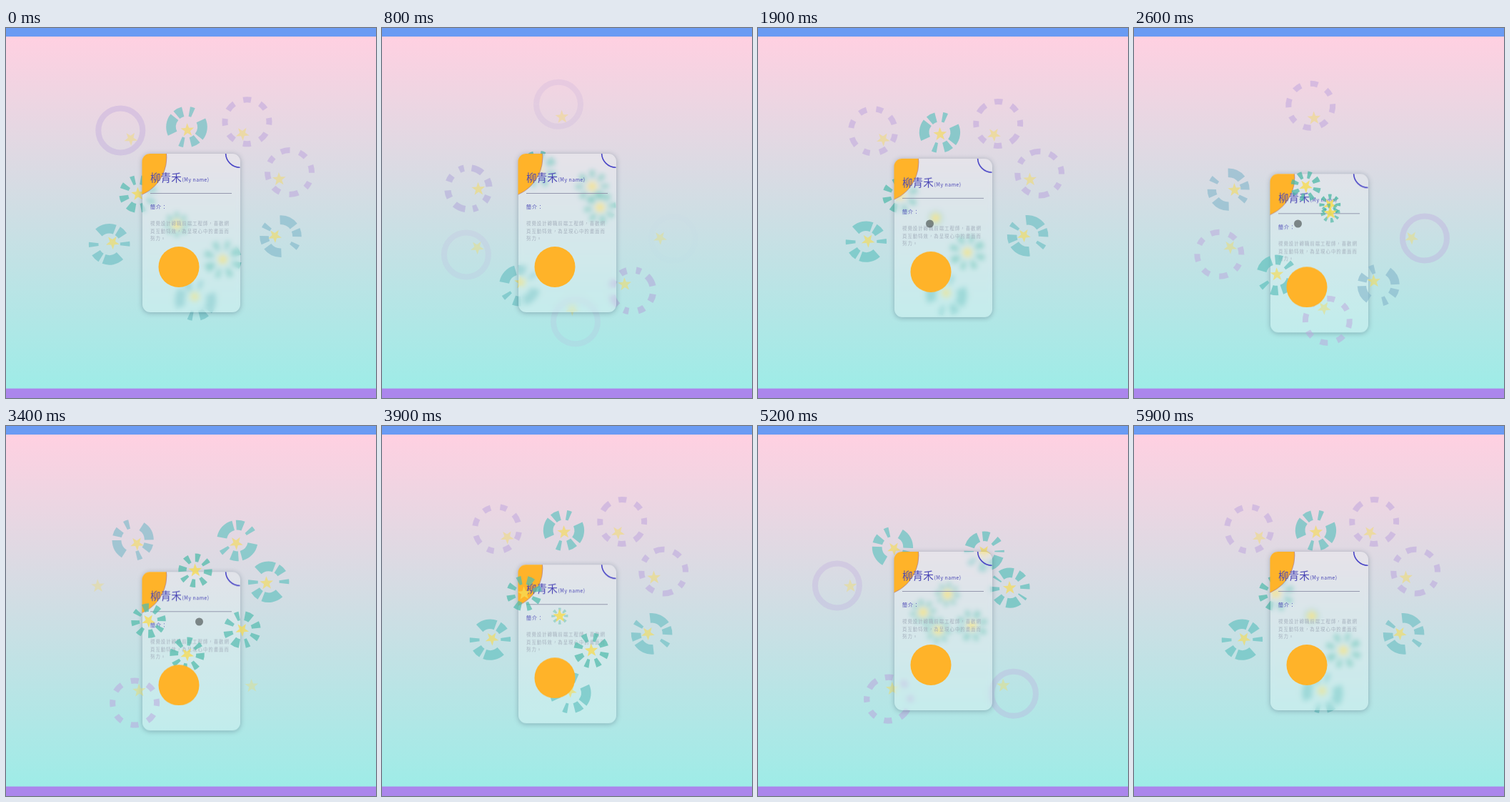
These frames come from a looping animation (518x518 px, 6000 ms). An HTML page with a canvas:

```html
<!DOCTYPE html>
<html lang="zh-Hant">
<head>
<meta charset="utf-8">
<style>
html, body { margin: 0; width: 100%; height: 100%; overflow: hidden; }
body {
  position: relative;
  background: linear-gradient(#6a9bf3 11.5px, transparent 12.5px 504px, #ab86ec 505.5px),
    linear-gradient(#ffd0e1 12px, #9eece7 505px);
}
canvas, svg { position: absolute; left: 0; top: 0; width: 518px; height: 518px; }
canvas { z-index: 1; }
#card, #info, #disc { will-change: transform; }
#card {
  position: absolute; z-index: 2; left: 190.5px; top: 176px; width: 137px; height: 222px;
  border-radius: 11px; background: rgba(255,255,255,.24);
  box-shadow: 0 1px 7px rgba(50,70,95,.36);
}
#info { z-index: 3; }
#disc { z-index: 5; }
#cursor {
  position: absolute; z-index: 6; left: -5.5px; top: -5.5px; width: 11px; height: 11px;
  border-radius: 50%; background: rgba(75,82,82,.66);
}
text { font-family: "Noto Sans CJK TC", "Noto Sans CJK", "Noto Sans", sans-serif; }
.ink { fill: #4b47b6; }
.body { fill: #a5b0bd; font-size: 6.4px; letter-spacing: 1px; }
</style>
</head>
<body>
<canvas id="stage"></canvas>
<div id="card"></div>
<svg id="info" viewBox="0 0 518 518">
  <clipPath id="clip"><rect x="190.5" y="176" width="137" height="222" rx="11"/></clipPath>
  <g clip-path="url(#clip)">
    <circle cx="168" cy="181" r="57" fill="#ffb329" stroke="#8a62b0" stroke-opacity=".5"/>
    <circle cx="327.6" cy="175.2" r="20" fill="none" stroke="#4a46c6" stroke-width="1.6"/>
  </g>
  <text class="ink" x="202" y="214.5" font-size="14.6">柳青禾</text>
  <text class="ink" x="246.5" y="214.5" font-size="6.9" font-weight="500" letter-spacing=".5">(My name)</text>
  <path d="M202 231.5H316" stroke="#8d8fa8" stroke-width=".9"/>
  <text class="ink" x="202" y="253.3" font-size="7" font-weight="500" letter-spacing="1">簡介：</text>
  <text class="body" x="202" y="276">視覺設計轉職前端工程師，喜歡網</text>
  <text class="body" x="202" y="286.5">頁互動特效，為呈現心中的畫面而</text>
  <text class="body" x="202" y="297">努力。</text>
</svg>
<svg id="disc" viewBox="0 0 518 518"><circle cx="242" cy="334.5" r="28.5" fill="#ffb329"/></svg>
<div id="cursor"></div>
<script>
const LOOP = 6000, LIFE = 2000, CX = 259, CY = 259, RAD = Math.PI / 180;
const HOVER = 1760, LEAVE = 3720, SLIDE = 800;
const GREEN = [65, 180, 155], TEAL = [105, 195, 194], LILAC = [188, 163, 221];
const $ = id => document.getElementById(id);
const canvas = $('stage'), ctx = canvas.getContext('2d');
const dpr = window.devicePixelRatio || 1;
canvas.width = canvas.height = Math.round(518 * dpr);

// Birth time of each flower, clockwise from the top
const births = [970, 405, 430, 840, 1420, 945, 1760, 945, 1420, 260];

const mix = (a, b, k) => a + (b - a) * k;
const blend = (a, b, k) => a.map((v, i) => mix(v, b[i], k));
const polar = (r, deg) => [CX + r * Math.cos(deg * RAD), CY + r * Math.sin(deg * RAD)];
function smooth(from, to, x) {
  const k = Math.min(1, Math.max(0, (x - from) / (to - from)));
  return k * k * (3 - 2 * k);
}

function bezier(x1, y1, x2, y2) {
  const f = (p, q, s) => 3 * (1 - s) * (1 - s) * s * p + 3 * (1 - s) * s * s * q + s * s * s;
  return x => {
    if (x <= 0) return 0;
    if (x >= 1) return 1;
    let lo = 0, hi = 1;
    for (let i = 0; i < 22; i++) {
      const m = (lo + hi) / 2;
      if (f(x1, x2, m) < x) lo = m; else hi = m;
    }
    return f(y1, y2, lo);
  };
}
const fly = bezier(.25, .24, .2, 1), ease = bezier(.25, .1, .25, 1);

// Eight even dashes swell into two long arcs at mid-life, then close into a circle
function ring(x, y, turn, u) {
  const outer = 29 * (1 - (1 - u) ** 7) + 6 * smooth(.55, .75, u);
  const width = mix(outer * .48, 8, smooth(.5, .75, u));
  const arc = (mid, span) => {
    ctx.beginPath();
    ctx.arc(x, y, outer - width / 2, (mid - span / 2) * RAD, (mid + span / 2) * RAD);
    ctx.stroke();
  };
  ctx.lineWidth = width;
  if (u > .86) return arc(0, 360);
  const swell = Math.exp(-(((u - .5) / .16) ** 2));
  for (const side of [turn, turn + 180]) {
    arc(side, 22 + 42 * swell);
    arc(side + 47 + 9 * swell, 20 + 6 * swell);
    arc(side + 92 + 8 * swell, 20 - 6 * swell);
    if (swell < .7) arc(side + 136, 18 * (1 - swell));
  }
}

function star(x, y, turn) {
  ctx.beginPath();
  for (let i = 0; i < 10; i++) {
    const r = i % 2 ? 4 : 9.8, a = (turn + i * 36) * RAD;
    ctx.lineTo(x + r * Math.cos(a), y + r * Math.sin(a));
  }
  ctx.fill();
}

function flower(k, t) {
  const u = ((t - births[k] + LOOP) % LIFE) / LIFE;
  const p = fly(u), base = -93 + 36 * k;
  const dir = base + 27 * (1 - p) ** 2;
  const late = smooth(.35, .85, u);
  const color = blend(blend(GREEN, TEAL, smooth(0, .5, u)), LILAC, smooth(.48, .75, u));
  const alpha = mix(.74, .52, smooth(.4, .8, u)) * smooth(.04, .1, u) * (1 - smooth(.8, 1, u));
  ctx.strokeStyle = `rgba(${color},${alpha})`;
  ring(...polar(135 * p + 18 * late, dir - 1.5 * late), base + 100, u);
  ctx.fillStyle = `rgba(246,219,84,${smooth(0, .08, u) * (.92 - .62 * u)})`;
  star(...polar(135 * p, dir), base);
}

function cursor(t) {
  const x = 240 - 11 * smooth(1900, 2600, t) + 41 * smooth(2600, 3400, t);
  $('cursor').style.opacity = t >= HOVER && t < LEAVE ? 1 : 0;
  $('cursor').style.transform = `translate(${x}px,273.5px)`;
}

function draw(now) {
  const t = (now - start) % LOOP;
  ctx.setTransform(dpr, 0, 0, dpr, 0, 0);
  ctx.clearRect(0, 0, 518, 518);
  births.forEach((_, k) => flower(k, t));

  const drop = 28.3 * (ease((t - HOVER) / SLIDE) - ease((t - LEAVE) / SLIDE));
  for (const id of ['card', 'info', 'disc']) $(id).style.transform = `translateY(${drop}px)`;
  // A lowered card slips behind the flowers and loses its frost
  const low = drop > 14;
  canvas.style.zIndex = low ? 4 : 1;
  $('card').style.backdropFilter = low ? 'none' : 'blur(3.5px)';
  cursor(t);
  requestAnimationFrame(draw);
}
const start = performance.now();
draw(start);
</script>
</body>
</html>
```
